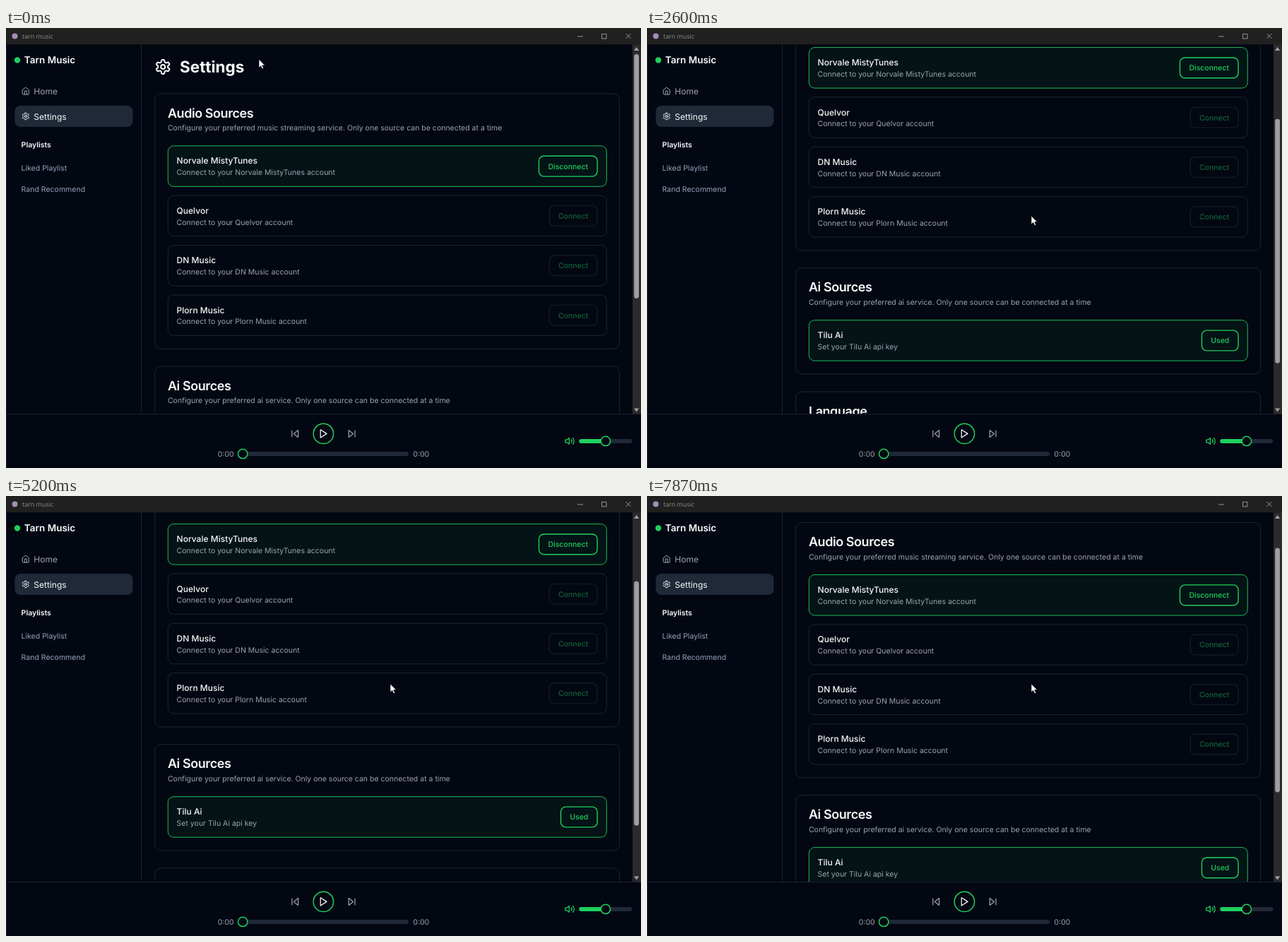
An HTML page that plays this animation: 899 px wide and 623 px high, repeating every 8000 ms.

```html
<!DOCTYPE html>
<html lang="en">
<head>
<meta charset="utf-8">
<title>Music settings</title>
<style>
  html, body { margin: 0; width: 100%; height: 100%; overflow: hidden; background: #030712; }
  svg { display: block; width: 899px; height: 623px; font-family: Inter, sans-serif; }
  text { white-space: pre; text-rendering: geometricPrecision; }
</style>
</head>
<body>
<svg id="stage" viewBox="0 0 899 623"></svg>
<script>
const BG = '#030712', LINE = '#1f2937', GREEN = '#1fcf5e', WHITE = '#f9fafb', MUTED = '#9ca3af', SLATE = '#94a3b8';
const SMALL = 10.52, BASE = 12.02, TITLE = 18.03, HEADING = 22.54;

// Text is placed by the vertical centre of its line.
const text = (x, middle, size, weight, fill, content, extra = '') =>
  `<text x="${x}" y="${middle + size * 0.364}" font-size="${size}" font-weight="${weight}" fill="${fill}" ${extra}>${content}</text>`;

const rect = (x, y, w, h, r, fill, stroke = 'none', width = 0.8) =>
  `<rect x="${x}" y="${y}" width="${w}" height="${h}" rx="${r}" fill="${fill}" stroke="${stroke}" stroke-width="${width}"/>`;

const circle = (x, y, r, fill, stroke = 'none', width = 1.5) =>
  `<circle cx="${x}" cy="${y}" r="${r}" fill="${fill}" stroke="${stroke}" stroke-width="${width}"/>`;

const line = (d, stroke, width = 1) => `<path d="${d}" fill="none" stroke="${stroke}" stroke-width="${width}"/>`;

// Icons are drawn on a 24 unit grid around their centre.
const icon = (x, y, size, colour, shapes) =>
  `<g transform="translate(${x} ${y}) scale(${size / 24}) translate(-12 -12)" fill="none" stroke="${colour}"
    stroke-width="2" stroke-linecap="round" stroke-linejoin="round">${shapes}</g>`;

const path = d => `<path d="${d}"/>`;

function gearShape() {
  let d = '';
  for (let tooth = 0; tooth < 6; tooth++) {
    const cos = Math.cos(tooth * Math.PI / 3), sin = Math.sin(tooth * Math.PI / 3);
    const at = (x, y) => `${(12 + x * cos - y * sin).toFixed(2)} ${(12 + x * sin + y * cos).toFixed(2)}`;
    d += `${tooth ? 'L' : 'M'}${at(-2.22, -7.82)}L${at(-2.22, -8)}A2 2 0 0 1 ${at(-0.22, -10)}L${at(0.22, -10)}`
      + `A2 2 0 0 1 ${at(2.22, -8)}L${at(2.22, -7.82)}A2 2 0 0 0 ${at(3.22, -6.09)}L${at(3.65, -5.84)}`
      + `A2 2 0 0 0 ${at(5.65, -5.84)}`;
  }
  return path(d + 'z') + '<circle cx="12" cy="12" r="3"/>';
}

const gear = gearShape();
const house = path('M3 9l9-7 9 7v11a2 2 0 0 1-2 2H5a2 2 0 0 1-2-2z M9 22V12h6v10');
const skipBack = path('M19 20L9 12l10-8z M5 19V5');
const skipForward = path('M5 4l10 8-10 8z M19 5v14');
const play = path('M5 3l14 9-14 9z');
const volume = path('M11 5L6 9H2v6h4l5 4z M15.54 8.46a5 5 0 0 1 0 7.07 M19.07 4.93a10 10 0 0 1 0 14.14');
const chevron = path('M6 9l6 6 6-6');

function button(label, width, middle, enabled) {
  const right = 837.8;
  return `<g opacity="${enabled ? 1 : 0.45}">`
    + rect(right - width + 0.7, middle - 14.4, width - 1.4, 28.8, 7, 'none', enabled ? GREEN : '#26323f', 1.4)
    + text(right - width / 2, middle, SMALL, 500, GREEN, label, 'text-anchor="middle"') + '</g>';
}

function service(top, name, note, label, width, active) {
  return rect(229.3, top + 0.4, 621, 57.5, 8, active ? 'rgba(31,207,94,.055)' : 'none', active ? GREEN : LINE, 0.9)
    + text(241.6, top + 21.6, BASE, 500, WHITE, name)
    + text(241.6, top + 38.1, SMALL, 400, MUTED, note)
    + button(label, width, top + 29.2, active);
}

function card(top, height, title, note = '') {
  return rect(210.6, top + 0.4, 658, height - 0.8, 8.5, 'none', LINE, 0.9)
    + text(228.9, top + 27.4, TITLE, 600, WHITE, title, 'letter-spacing="-.45"')
    + text(228.9, top + 48.6, SMALL, 400, MUTED, note);
}

function settingsPage() {
  const sources = ['Norvale MistyTunes', 'Quelvor', 'DN Music', 'Plorn Music'];
  const rows = sources.map((name, i) => service(166.5 + i * 70.35, name, `Connect to your ${name} account`,
    i ? 'Connect' : 'Disconnect', i ? 69.3 : 84, !i));
  return icon(222.2, 54.9, 24, WHITE, gear)
    + text(246, 54.9, HEADING, 700, WHITE, 'Settings')
    + card(92.6, 362, 'Audio Sources', 'Configure your preferred music streaming service. Only one source can be connected at a time')
    + rows.join('')
    + card(478.6, 151, 'Ai Sources', 'Configure your preferred ai service. Only one source can be connected at a time')
    + service(552.6, 'Tilu Ai', 'Set your Tilu Ai api key', 'Used', 53, true)
    + card(653.9, 102.8, 'Language')
    + rect(229.3, 708.7, 621, 29.4, 7, 'none', LINE, 0.9)
    + text(238.4, 723.3, SMALL, 500, WHITE, 'English')
    + icon(834.5, 723.3, 12, '#7d8591', chevron);
}

function titleBar() {
  return rect(0, 0, 899, 23.2, 0, '#202020')
    + circle(12.5, 11.5, 4, '#a58bb5')
    + text(23, 11.8, 8.9, 400, '#8f8f8f', 'tarn music', 'font-family="Open Sans, sans-serif"')
    + line('M809 12h8 M843.5 8.5h6.5v6.5h-6.5z M877.5 8l7 7 M884.5 8l-7 7', '#a3a3a3', 0.9);
}

function sidebar() {
  return line('M191.6 23.2V546.5', LINE, 0.9)
    + circle(16, 45.5, 4.2, GREEN)
    + text(25.8, 45.4, 13.52, 600, WHITE, 'Tarn Music')
    + icon(27.8, 89.1, 12, MUTED, house)
    + text(39.3, 89.3, BASE, 400, MUTED, 'Home')
    + rect(12.4, 110, 167.2, 30, 8, LINE)
    + icon(27.8, 125, 12, WHITE, gear)
    + text(39.3, 125.2, BASE, 400, WHITE, 'Settings')
    + text(21.6, 165.5, SMALL, 600, WHITE, 'Playlists')
    + text(21.6, 198.3, SMALL, 400, SLATE, 'Liked Playlist')
    + text(21.6, 228.3, SMALL, 400, SLATE, 'Rand Recommend');
}

function player() {
  return line('M0 546.8H899', LINE, 0.9)
    + icon(409.2, 574.4, 15, MUTED, skipBack)
    + circle(449.4, 574.4, 14.2, 'none', GREEN)
    + icon(449.6, 574.4, 15, WHITE, play)
    + icon(489.6, 574.4, 15, MUTED, skipForward)
    + text(299.8, 602.9, SMALL, 400, MUTED, '0:00')
    + rect(328.5, 600, 241.5, 6, 3, LINE)
    + circle(335.2, 602.9, 6.7, BG, GREEN)
    + text(576.3, 602.9, SMALL, 400, MUTED, '0:00')
    + icon(798, 584.9, 15, GREEN, volume)
    + rect(811.3, 582, 75, 6, 3, LINE)
    + rect(811.3, 582, 37, 6, 3, GREEN)
    + circle(848.9, 584.9, 6.7, BG, GREEN);
}

function scrollbar() {
  return rect(887, 23.2, 12, 523.2, 0, '#2b2b2b')
    + '<path d="M889 32l3.6-5 3.6 5z M889 538.5l3.6 5 3.6-5z" fill="#9f9f9f"/>'
    + '<rect id="thumb" x="889.2" width="6.8" height="346" rx="3.4" fill="#9f9f9f"/>';
}

const stage = document.getElementById('stage');
stage.innerHTML = `<clipPath id="view"><path d="M192 23.2H887V546.4H192z"/></clipPath>`
  + rect(0, 0, 899, 623, 0, BG)
  + `<g clip-path="url(#view)"><g id="page">${settingsPage()}</g></g>`
  + titleBar() + sidebar() + scrollbar() + player()
  + line('M.4 23V623', '#232a36', 0.8)
  + `<path id="cursor" d="M0 0v12l2.8-2.6 1.9 4.3 2-.9-1.9-4.2h3.8z" fill="#fff" stroke="#000" stroke-width=".7"/>`;

const page = document.getElementById('page');
const thumb = document.getElementById('thumb');
const cursor = document.getElementById('cursor');

const LOOP = 8000, STEP = 1000 / 15;
// [step, scroll offset]
const scrollKeys = [[0, 0], [23, 0], [24, 26.3], [39, 139.3], [43, 139.3], [52, 228.3], [69, 228.3],
  [78, 127.3], [83, 127.3], [97, 0], [112, 0], [118, 55.4], [120, 55.4]];

function scrollAt(step) {
  const next = Math.max(1, scrollKeys.findIndex(([end]) => step <= end));
  const [start, from] = scrollKeys[next - 1], [end, to] = scrollKeys[next];
  const left = 1 - (step - start) / (end - start);
  return to + (from - to) * left * left;
}

function draw(now) {
  const step = Math.floor((now % LOOP + 5) / STEP) % 120;
  const scroll = scrollAt(step);
  page.setAttribute('transform', `translate(0 ${-scroll})`);
  thumb.setAttribute('y', 37 + scroll * 0.658);

  const p = Math.min(1, step / 7), eased = p * p * (3 - 2 * p);
  cursor.setAttribute('transform', `translate(${358 + 186 * eased} ${44.3 + 221.7 * eased})`);
}

const began = performance.now();
function tick() {
  draw(performance.now() - began);
  requestAnimationFrame(tick);
}
tick();
</script>
</body>
</html>
```
